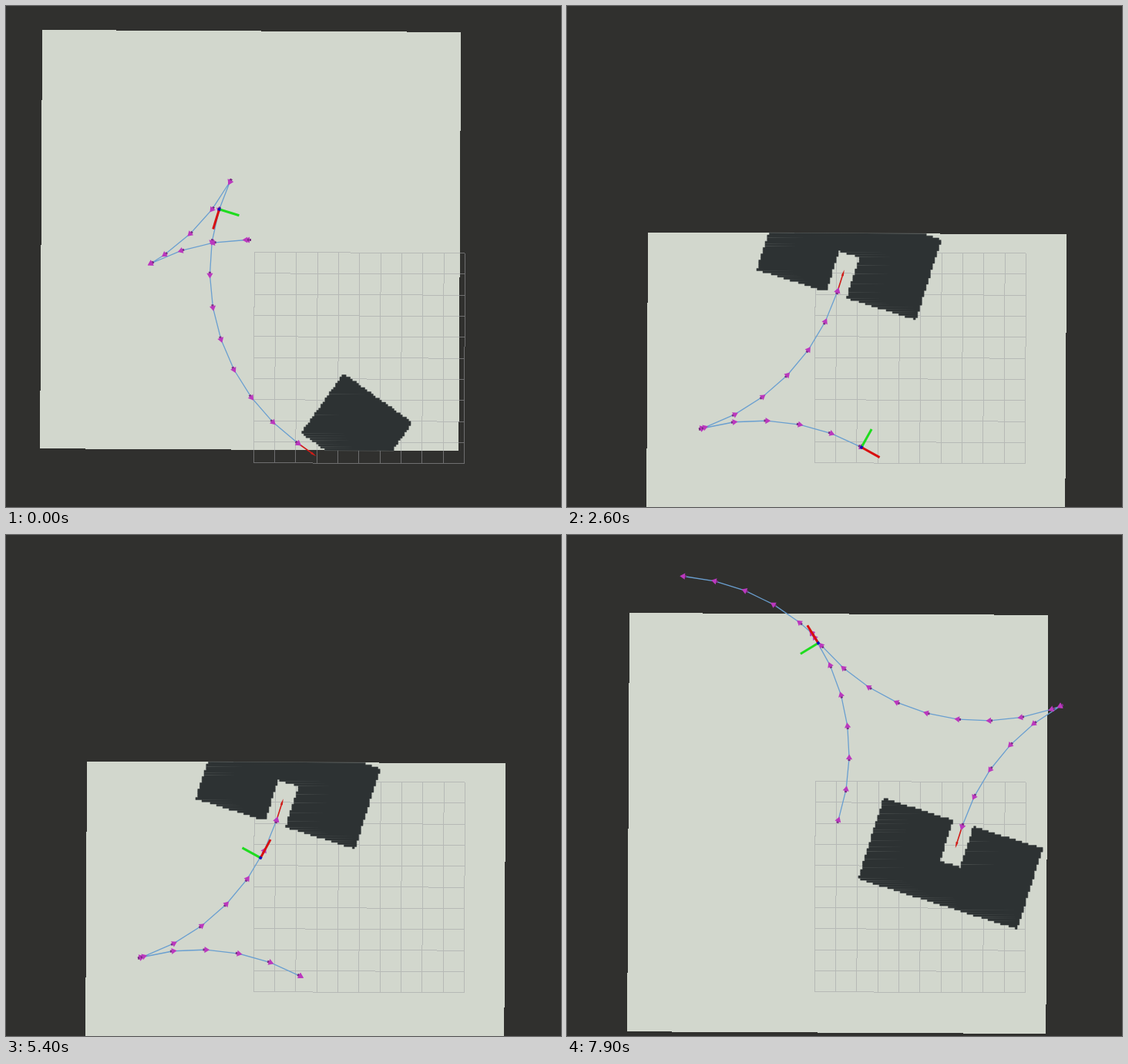
An HTML page for the animation above (8000 ms loop, 720 by 650 pixels).

```html
<!DOCTYPE html>
<html lang="en">
<head>
<meta charset="utf-8">
<title>Parking planner</title>
<style>
html, body { margin: 0; width: 100%; height: 100%; overflow: hidden; background: #30302e; }
svg { display: block; }
#map, #grid { shape-rendering: crispEdges; }
</style>
</head>
<body>
<svg width="720" height="650" viewBox="0 0 720 650">
  <g id="map"></g>
  <path id="grid" fill="none" stroke="#a0a0a4" stroke-opacity=".55"/>
  <g id="plan"></g>
  <g id="car" stroke-width="3">
    <path d="M0 0V-27" stroke="#1fdc1f"/>
    <path d="M0 0H27" stroke="#d81010"/>
    <rect x="-1.8" y="-1.8" width="3.6" height="3.6" fill="#1010b8" stroke="none"/>
  </g>
  <path id="obstacle" fill="#2d3233" stroke="#6f7472" stroke-width=".3" paint-order="stroke"/>
  <g id="drag"></g>
</svg>
<script>
const LOOP = 8000, FRAME = 100;
const RADIUS = 274, STOP_SHORT = 2.5;
const CELLS = 200, CELL = 2.716, TILT = .0053;
const FORWARD = 1, REVERSE = -1;
const DEG = 180 / Math.PI;
const el = id => document.getElementById(id);
const place = (x, y, a) => `translate(${x} ${y}) rotate(${a * DEG})`;

// Every leg is a circular arc between two points; bend is the sign of its curvature.
function arc(from, to, dir, bend = -1) {
  const dx = to[0] - from[0], dy = to[1] - from[1];
  const sweep = 2 * Math.asin(Math.hypot(dx, dy) / (2 * RADIUS));
  const a0 = Math.atan2(dy, dx) - bend * sweep / 2, r = RADIUS * bend;
  const pose = s => {
    const a = a0 + s / r;
    return [from[0] + r * (Math.sin(a) - Math.sin(a0)),
            from[1] - r * (Math.cos(a) - Math.cos(a0)),
            dir === FORWARD ? a : a + Math.PI];
  };
  return { dir, pose, length: RADIUS * sweep };
}

const merge = [317.5, 127.3], cusp = [175, 548];

const scenes = [
  {
    start: 0, origin: [47, 31], depart: -135, speed: .284, firstLeg: 2, step: 42.7, fromGoal: true,
    legs: [
      arc([314, 303.5], [188, 334], FORWARD),
      arc([188, 334], [290.5, 228], REVERSE),
      arc([290.5, 228], [379, 567.5], FORWARD)
    ]
  },
  {
    start: 2600, origin: [105, 293.5], depart: 3192, speed: .1905, firstLeg: 0, step: 42.7, fromGoal: true,
    legs: [
      arc([382, 572.5], cusp, REVERSE),
      arc(cusp, [351, 370], FORWARD)
    ]
  },
  {
    start: 6700, origin: [81, 101], depart: 6800, speed: .217, firstLeg: 0, step: 41.2, fromGoal: false,
    legs: [
      arc([352, 370], merge, FORWARD),
      arc([151, 53.5], merge, REVERSE, 1),
      arc(merge, [640, 222], REVERSE),
      arc([640, 222], [512.5, 378.5], FORWARD)
    ]
  }
];

// Waypoints sit at even steps, counted from the goal or from the last change of gear.
function waypoints({ legs, step, fromGoal }) {
  let driven = 0;
  return legs.map((leg, i) => {
    if (!i || legs[i - 1].dir !== leg.dir) driven = 0;
    const stops = [0];
    for (let s = fromGoal ? leg.length % step : step - driven % step; s < leg.length; s += step) stops.push(s);
    driven += leg.length;
    return [...stops, leg.length].map(leg.pose);
  });
}

function carPose(scene, t) {
  const legs = scene.legs.slice(scene.firstLeg);
  const total = legs.reduce((sum, leg) => sum + leg.length, 0);
  let s = Math.max(0, Math.min(total - STOP_SHORT, (t - scene.depart) * scene.speed));
  for (const leg of legs) {
    if (s <= leg.length) return leg.pose(s);
    s -= leg.length;
  }
}

const goalArrow = (x, y, a, length) => `<path transform="${place(x, y, a)}" fill="#d01c18"
  d="M0 -.8H${length - 8}V-1.6L${length} 0L${length - 8} 1.6V.8H0Z"/>`;

const waypoint = ([x, y, a]) => `<g transform="${place(x, y, a)}">
  <path d="M-4 0H0" stroke="#7c2c86" stroke-width="3"/>
  <path d="M4.7 0L-2 -4.1V4.1Z" fill="#bb38be"/></g>`;

// A U-shaped bay around the goal, rasterised on the map's cells.
function obstaclePath([gx, gy, a], [ox, oy]) {
  const c = Math.cos(a), s = Math.sin(a);
  const filled = (col, row) => {
    const u = (col + .5) * CELL, v = (row + .5) * CELL;
    const dx = ox + u - v * TILT - gx, dy = oy + v + u * TILT - gy;
    const along = dx * c + dy * s, side = Math.abs(dy * c - dx * s);
    return along > -4.5 && along < 104.5 && side < 108 && !(side < 14 && along < 51);
  };
  let d = '';
  for (let row = 0; row < CELLS; row++) {
    let from = -1;
    for (let col = 0; col <= CELLS; col++) {
      const on = col < CELLS && filled(col, row);
      if (on && from < 0) from = col;
      if (!on && from >= 0) {
        d += `M${from} ${row}H${col}v1.15H${from}Z`;
        from = -1;
      }
    }
  }
  return d;
}

function prepareScene(scene) {
  const marks = waypoints(scene);
  const goal = marks[marks.length - 1].slice(-1)[0];
  const line = marks.map(leg => 'M' + leg.map(([x, y]) => `${x} ${y}`).join('L')).join('');
  const skew = CELL * TILT;
  scene.matrix = `matrix(${CELL} ${skew} ${-skew} ${CELL} ${scene.origin})`;
  scene.map = `<rect width="${CELLS}" height="${CELLS}" fill="#d2d7cd" transform="${scene.matrix}"/>`;
  scene.plan = `<path d="${line}" fill="none" stroke="#6a9fd0" stroke-width="1.3"/>` +
    goalArrow(...goal, 29) + marks.flat().map(waypoint).join('');
  scene.obstacle = obstaclePath(goal, scene.origin);
}

let grid = '';
for (let i = 0; i <= 10; i++) {
  const k = i * 27.32;
  grid += `M0 ${k}H273.2M${k} 0V273.2`;
}
el('grid').setAttribute('d', grid);
el('grid').setAttribute('transform', 'matrix(1 .004 -.004 1 322.3 319.5)');
el('drag').innerHTML = goalArrow(458.5, 510.5, Math.atan2(-32, 10.5), 33.5);
scenes.forEach(prepareScene);

let shown = null;
function showScene(scene) {
  if (scene === shown) return;
  shown = scene;
  el('map').innerHTML = scene.map;
  el('plan').innerHTML = scene.plan;
  el('obstacle').setAttribute('d', scene.obstacle);
  el('obstacle').setAttribute('transform', scene.matrix);
}

function draw(ms) {
  const t = Math.floor((ms % LOOP) / FRAME) * FRAME;
  const scene = scenes.filter(s => t >= s.start).pop();
  showScene(scene);
  el('car').setAttribute('transform', place(...carPose(scene, t)));
  el('drag').style.display = t >= 6500 && t < 6700 ? '' : 'none';
}

const began = performance.now();
function tick() {
  draw(performance.now() - began);
  requestAnimationFrame(tick);
}
tick();
</script>
</body>
</html>
```
